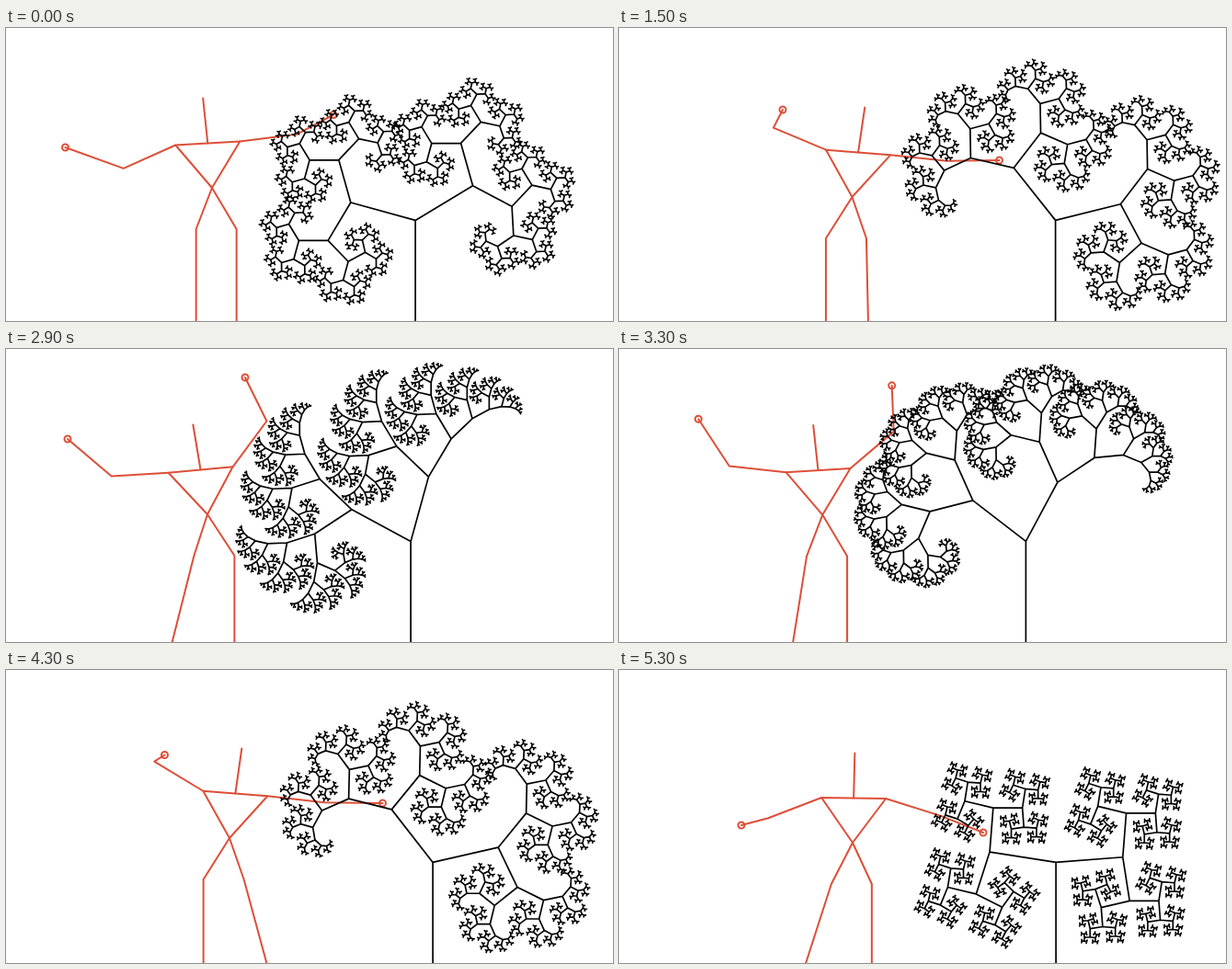
Recreate the animation shown at these times as an HTML page with a canvas. Size 660 by 319 pixels, loop 5.4 s.

```html
<!DOCTYPE html>
<html>
<head>
<meta charset="utf-8">
<style>
html, body { margin: 0; width: 100%; height: 100%; overflow: hidden; background: #fff; }
canvas { display: block; }
</style>
</head>
<body>
<canvas id="stage" width="660" height="319"></canvas>
<script>
const ctx = document.getElementById('stage').getContext('2d');
const LOOP = 5400, STEP = 100;
const TREE = { offset: 221.1, top: 209.4, length: 72.9, ratio: 0.66, depth: 10 };
const UPPER_ARM = 62, SHOULDER = 35, TORSO = 48.5, SHIN_START = 45;

// A pose: hip x and y, sidestep of a foot (left if negative),
// left hand, right hand, bend of the left elbow in degrees
const reach  = [258, 185, 10, 188, 78, 419, 148, 18];
const bent   = [253.5, 184, 2, 178, 89, 413.5, 144, 20];
const raised = [219, 180, -24, 67, 98, 260, 31, 22];
const mix = (a, b, k) => a.map((v, i) => v + (b[i] - v) * k);

const keys = [
  [0,    [224, 174, 0, 64.5, 130, 356, 94.5, 23]],
  [700,  [238.5, 178, 20, 115, 100, 403.5, 144, 8]],
  [1150, reach],
  [1500, bent],
  [1800, mix(bent, raised, 0.4)],
  [2900, raised],
  [3800, [230, 182, 4, 131.5, 51, 370.5, 75, 27]],
  [4300, [243, 183, 25, 172.5, 92.5, 409.5, 145, 12]],
  [4800, reach],
  [5300, [254, 188, -28, 133, 169, 396, 177, 2]]
];

// Cubic Hermite interpolation through unevenly spaced poses
function poseAt(t) {
  const last = keys.length - 1;
  let n = 0;
  while (n < last - 1 && t >= keys[n + 1][0]) n++;
  const [t0, a] = keys[n], [t1, b] = keys[n + 1];
  const [tp, prev] = keys[Math.max(n - 1, 0)];
  const [tn, next] = keys[Math.min(n + 2, last)];
  const d = t1 - t0, u = (t - t0) / d, u2 = u * u, u3 = u2 * u;
  return a.map((v, i) => {
    const m0 = (b[i] - prev[i]) / (t1 - tp) * d;
    const m1 = (next[i] - v) / (tn - t0) * d;
    return v + (b[i] - v) * (3 * u2 - 2 * u3) + m0 * (u3 - 2 * u2 + u) + m1 * (u3 - u2);
  });
}

function path(...points) {
  ctx.beginPath();
  points.forEach(([x, y]) => ctx.lineTo(x, y));
  ctx.stroke();
}

function ring([x, y]) {
  ctx.beginPath();
  ctx.arc(x, y, 3.5, 0, 2 * Math.PI);
  ctx.stroke();
}

// The arm points at the hand; bend turns the upper arm away from that line
function drawArm(shoulder, hand, side, bendOf) {
  const rise = Math.atan2(shoulder[1] - hand[1], side * (hand[0] - shoulder[0]));
  const angle = rise - bendOf(rise);
  const elbow = [
    shoulder[0] + side * UPPER_ARM * Math.cos(angle),
    shoulder[1] - UPPER_ARM * Math.sin(angle)
  ];
  path(shoulder, elbow, hand);
  ring(hand);
}

// The whole body leans towards the lower hand
function drawFigure(hip, step, handL, handR, bend) {
  const [x, y] = hip;
  const lean = 10 * Math.tanh((handR[1] - handL[1]) / 70);
  const neck = [x + lean, y - TORSO];
  const shoulder = side => [neck[0] + side * SHOULDER, neck[1] + side * lean * 0.43];
  const knee = side => [x + side * 22 - lean, y + SHIN_START];
  const left = shoulder(-1), right = shoulder(1);
  const kneeL = knee(-1), kneeR = knee(1);

  ctx.strokeStyle = '#dd4f38';
  ctx.lineWidth = 2;
  path([neck[0] + lean * 1.1, neck[1] - 49], neck);
  path(hip, left, right, hip);
  path([kneeL[0] + Math.min(step, 0), 320], kneeL, hip, kneeR, [kneeR[0] + Math.max(step, 0), 320]);
  drawArm(left, handL, -1, () => bend * Math.PI / 180);
  drawArm(right, handR, 1, rise => 0.07 + 0.3 * rise);
}

// The slope from the hip to each hand sets the two branching angles
function drawTree(hip, ...hands) {
  const turns = hands.map(([x, y]) => Math.atan2(x - hip[0], hip[1] - y));
  const x = hip[0] + TREE.offset;

  function branch(x, y, angle, length, depth) {
    for (const turn of turns) {
      const dir = angle + turn;
      const nx = x + length * Math.sin(dir), ny = y - length * Math.cos(dir);
      ctx.moveTo(x, y);
      ctx.lineTo(nx, ny);
      if (depth > 1) branch(nx, ny, dir, length * TREE.ratio, depth - 1);
    }
  }

  ctx.strokeStyle = '#000';
  ctx.lineWidth = 1.7;
  ctx.beginPath();
  ctx.moveTo(x, 322);
  ctx.lineTo(x, TREE.top);
  branch(x, TREE.top, 0, TREE.length, TREE.depth);
  ctx.stroke();
}

function render(now) {
  const t = Math.floor(now % LOOP / STEP) * STEP;
  const [hx, hy, step, lx, ly, rx, ry, bend] = poseAt(t);
  const hip = [hx, hy], handL = [lx, ly], handR = [rx, ry];
  ctx.fillStyle = '#fff';
  ctx.fillRect(0, 0, 660, 319);
  ctx.lineCap = ctx.lineJoin = 'round';
  drawFigure(hip, step, handL, handR, bend);
  drawTree(hip, handL, handR);
}

const begun = performance.now();
function tick() {
  render(performance.now() - begun);
  requestAnimationFrame(tick);
}
tick();
</script>
</body>
</html>
```
